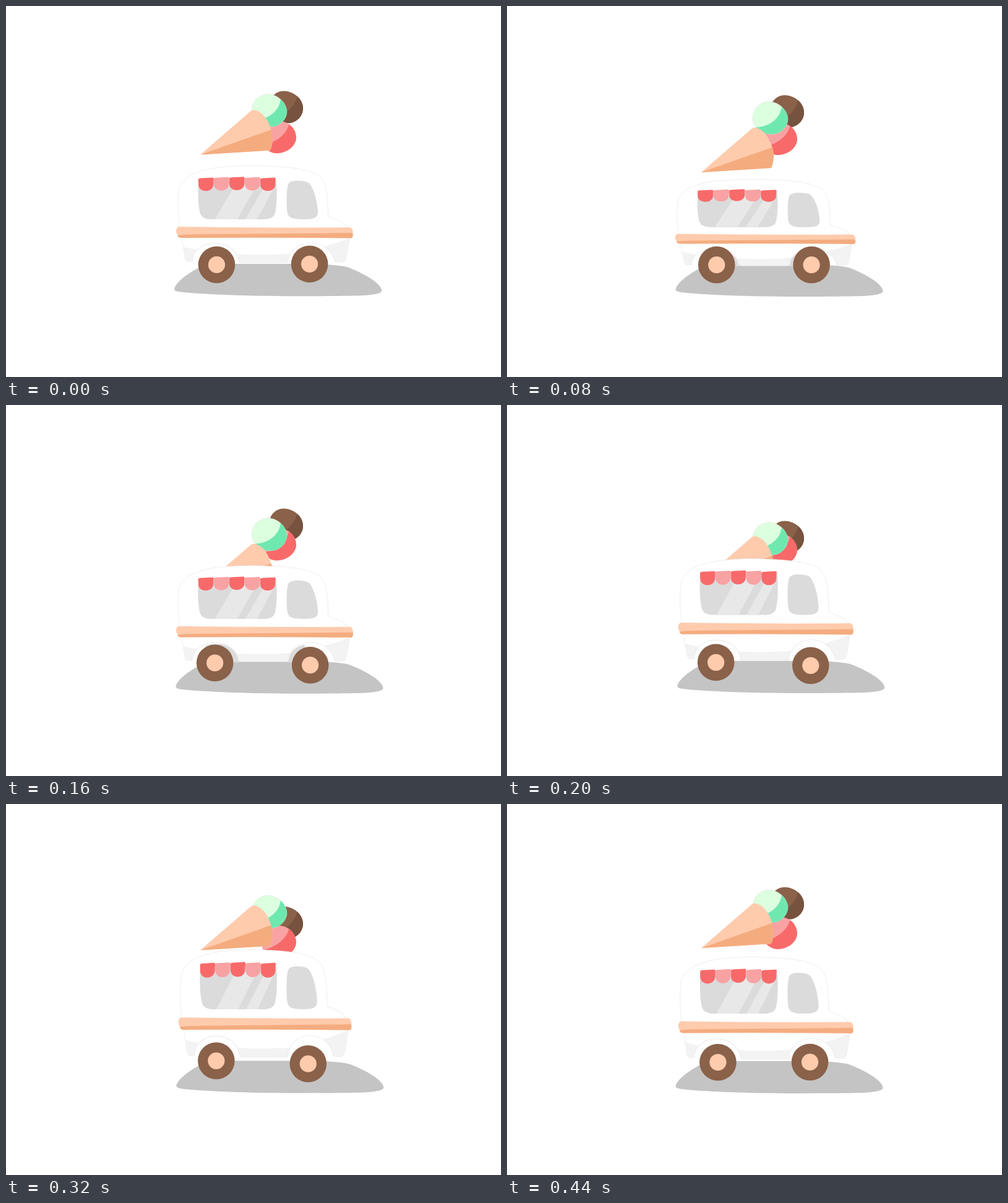
An HTML page for the animation above (480 ms loop, 800 px wide and 600 px high).

```html
<!DOCTYPE html>
<html lang="en">
<head>
<meta charset="utf-8">
<title>Ice cream van</title>
<style>
  html, body { margin: 0; width: 100%; height: 100%; overflow: hidden; background: #fff; }
  svg { display: block; width: 800px; height: 600px; }
  .peach { fill: #ffcbad; }
  .tan { fill: #f4ac7f; }
  .brown { fill: #8a6149; }
  .red { fill: #f86a6a; }
  .pink { fill: #f9a2a4; }
  .glass { fill: #dbdbdb; }
  .glare { fill: #e8e8e8; }
  .shade { fill: #f3f3f3; }
  .white { fill: #fff; }
  .edge { stroke: #dcdcdc; stroke-width: .5; }
</style>
</head>
<body>
<svg viewBox="0 0 800 600">
  <defs>
    <clipPath id="brownClip"><path id="brownBall" d="M426 157C429 146 438 139 449 139C464 139 480 151 480 167C480 181 468 190 458 191C439 191 423 174 426 157Z"/></clipPath>
    <clipPath id="mintClip"><path id="mintBall" d="M397 168C399 153 411 144 424 144C440 145 454 158 454 174C452 188 440 197 427 197C410 197 396 184 397 168Z"/></clipPath>
    <clipPath id="pinkClip"><path id="pinkBall" d="M413 213C414 197 427 187 443 187C457 188 469 199 469 214C468 229 452 239 437 239C423 238 412 227 413 213Z"/></clipPath>
    <clipPath id="coneClip"><path id="coneShape" d="M314 242L396 171Q400 168 406 171C417 175 425 189 428 200C433 212 431 226 427 235Z"/></clipPath>
    <clipPath id="paneClip"><path id="pane" d="M311 284H437C438 302 438 325 434 337Q432 343 420 345H330Q318 344 315 338C310 328 310 300 311 284Z"/></clipPath>
    <clipPath id="hullClip"><path id="hull" d="M281 358C277 335 278 312 279 300C283 264 341 258 400 258C445 259 489 261 508 276C521 290 519 318 521 341C535 346 546 349 552 358L555 376L550 407Q548 414 544 414H531C525 380 460 370 455 415H378C372 374 303 374 301 413H293Q290 412 289 406L284 376Z"/></clipPath>
  </defs>

  <path id="shadow" fill="#c4c4c4" d="M272 458C273 446 308 422 325 419Q340 417.500 375 417.500H500Q548 420 555 424C578 433 607 449 607 461C606 470 560 469 530 469.500C440 470.500 340 469 283 463Q271 462 272 458Z"/>

  <g id="brown">
    <use href="#brownBall" class="brown"/>
    <path clip-path="url(#brownClip)" fill="#77523f" d="M471 145C469 162 452 179 430 184V200H490V145Z"/>
  </g>
  <g id="pink">
    <use href="#pinkBall" class="pink"/>
    <path clip-path="url(#pinkClip)" class="red" d="M458 185C458 206 438 221 414 227V245H475V185Z"/>
  </g>
  <g id="mint">
    <use href="#mintBall" fill="#dcffdf" class="edge"/>
    <path clip-path="url(#mintClip)" fill="#6fe8b0" d="M444 151C442 171 425 186 398 186V202H460V151Z"/>
  </g>
  <g id="cone">
    <use href="#coneShape" class="peach"/>
    <path clip-path="url(#coneClip)" class="tan" d="M314 242L430 201H440V245Z"/>
  </g>

  <g id="van">
    <use href="#hull" class="white edge"/>
    <g clip-path="url(#hullClip)">
      <path class="shade" d="M282 388C330 403 410 404 456 401C500 394 530 386 558 374V420H282ZM541 344L556 362Q548 358 541 344Z"/>
    </g>
    <path class="white edge" d="M301 413C303 374 372 374 377 415M455 415C460 372 524 374 531 414"/>
    <g id="arches" class="glass">
      <path d="M322 389C350 379 374 392 376 416H340Z"/>
      <path d="M456 416C457 402 464 391 482 387L490 416Z"/>
    </g>

    <use href="#pane" class="glass"/>
    <path class="glare" clip-path="url(#paneClip)" d="M337 346L373 284H408L373 346ZM386 346L422 284H438L405 346Z"/>
    <path class="glass" d="M456 288C458 281 478 281 488 285C497 292 503 315 504 332C504 342 500 345 480 345C462 345 455 343 454 330C453 315 453 297 456 288Z"/>
    <g id="awning"></g>

    <path class="peach" d="M279 357Q420 359 556 358C561 360 561 367 560 369L278 371C274 367 274 359 279 357Z"/>
    <path class="tan" d="M277 371Q290 369 330 369L560 367Q562 374 558 375.500Q420 374 284 375Q278 375 277 371Z"/>
  </g>

  <g id="rear"><circle r="29.800" class="brown"/><circle r="13.600" class="peach"/></g>
  <g id="front"><circle r="29.800" class="brown"/><circle r="13.600" class="peach"/></g>
</svg>
<script>
  const STEP = 40, STEPS = 12;
  const $ = id => document.getElementById(id);
  const move = (id, x, y) => $(id).setAttribute('transform', `translate(${x} ${y})`);

  // Sum of harmonics, each given as [amplitude, step of its crest]
  const wave = (s, ...parts) => parts.reduce((sum, [amp, crest], i) =>
    sum + amp * Math.cos(2 * Math.PI * (i + 1) * (s - crest) / STEPS), 0);

  function pose(s) {
    // The load is thrown up one piece after the other
    move('cone', 0, 13.75 + wave(s, [31.7, 3.82], [7.3, 3.9], [2.2, 0]));
    move('mint', 0, 13.75 + wave(s, [25.6, 4.75], [6.9, 5.3]));
    move('brown', 0, 19 + wave(s, [29, 5.8], [9.6, 0.2], [1, 2]));
    move('pink', 0, 7.2 + wave(s, [13.4, 5.57], [5.3, 0.27]));

    // Small orbits on the ground
    move('shadow', 2 + wave(s, [1.9, 6.5]), -1.9 + wave(s, [1.6, 0.8], [1, 1.5]));
    move('rear', 339.3 + wave(s, [1.7, 10.4]), 417 + wave(s, [1.8, 1.2]));
    move('front', 490.2 + wave(s, [2, 2.6]), 419.4 + wave(s, [2.1, 5.7]));

    // The body sinks and widens together
    const squash = wave(s, [1, 2.05], [0.24, 2.05], [0.09, 2]);
    const top = 253 + 20.5 * squash, bottom = 413.7 + 4.9 * squash;
    const left = 275.9 - 3.2 * squash, right = 560.6 + 2.2 * squash;
    const sx = (right - left) / 286, sy = (bottom - top) / 157;
    $('van').setAttribute('transform',
      `matrix(${sx} 0 0 ${sy} ${left - 275 * sx} ${top - 258 * sy})`);
    $('arches').style.display = squash > 0.3 ? '' : 'none';
  }

  for (let i = 0; i < 5; i++) {
    const a = 310.7 + 25 * i, b = a + 25;
    const y = 276 + Math.abs(i - 2) * .6;
    $('awning').innerHTML += `<path class="${i % 2 ? 'pink' : 'red'}" d="M${a} ${y + 3}`
      + `Q${a} ${y + 1.4} ${a + 3} ${y + 1}L${b - 2} ${y}Q${b} ${y} ${b} ${y + 2}L${b - .5} ${y + 11}`
      + `C${b - 1} ${y + 25} ${a + 1} ${y + 25} ${a + .3} ${y + 12}Z"/>`;
  }

  let last = -1;
  function frame(now) {
    const s = Math.floor(now / STEP) % STEPS;
    if (s !== last) pose(last = s);
    requestAnimationFrame(frame);
  }
  pose(0);
  requestAnimationFrame(frame);
</script>
</body>
</html>
```
